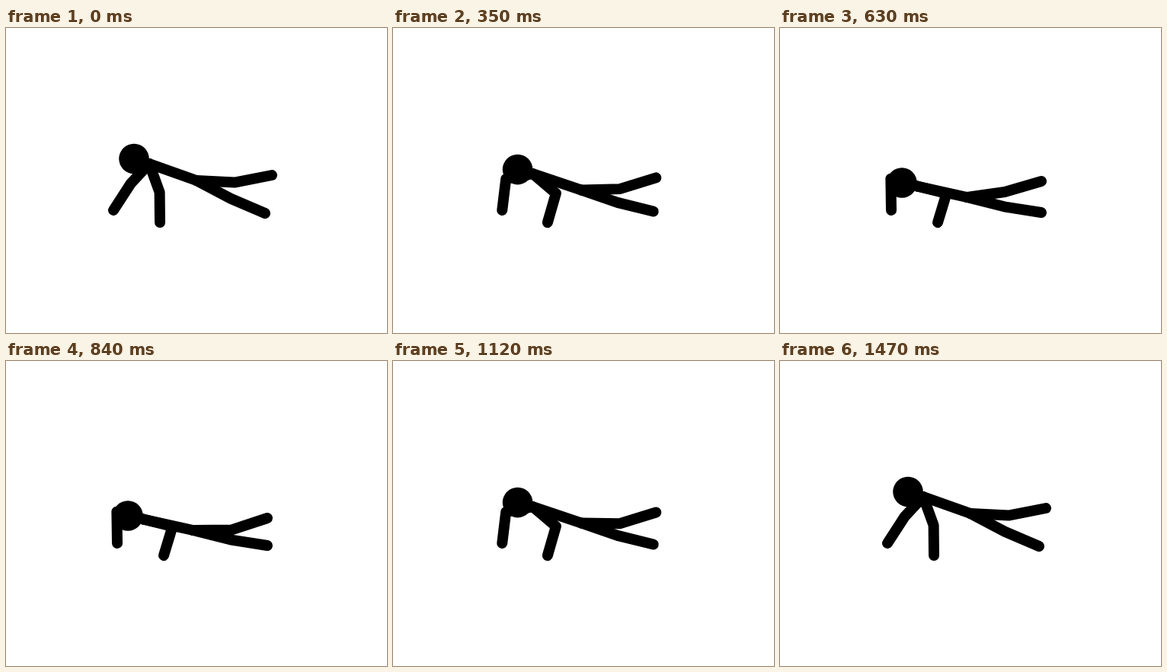
An HTML page with a canvas for the animation above (1540 ms loop, 500 by 400 pixels).

```html
<!DOCTYPE html>
<html lang="en">
<head>
<meta charset="utf-8">
<title>Push-ups</title>
<style>
  html, body { margin: 0; width: 100%; height: 100%; overflow: hidden; background: #fff; }
  canvas { display: block; }
</style>
</head>
<body>
<canvas id="stage" width="500" height="400"></canvas>
<script>
const ctx = document.getElementById('stage').getContext('2d');
const STEP = 70, COUNT = 22;
const DOWN = 9, UP = 12;   // the body rests low between these steps

const clamp = (v, lo, hi) => Math.max(lo, Math.min(hi, v));

// Middle joint of a two-part limb from a to b; side picks the way it bends.
function joint(a, b, la, lb, side) {
  const dx = b[0] - a[0], dy = b[1] - a[1];
  const d = Math.hypot(dx, dy);
  const along = (d * d + la * la - lb * lb) / (2 * d);
  const out = side * Math.sqrt(Math.max(0, la * la - along * along));
  return [a[0] + (dx * along - dy * out) / d, a[1] + (dy * along + dx * out) / d];
}

function limb(...points) {
  ctx.beginPath();
  points.forEach(p => ctx.lineTo(...p));
  ctx.stroke();
}

function draw(step) {
  const t = Math.min(step, COUNT - 1 - step, DOWN) / DOWN;
  const drop = t ** 1.37;
  const smooth = drop * drop * (3 - 2 * drop);
  const sink = 8 + 5 * clamp((step - DOWN) / (UP - DOWN), 0, 1);

  const head = [168 - 8 * t, 171.5 + 31.5 * drop];
  const neck = [188 - 8 * t, 178 + 29.5 * drop];
  const hip = [250 - 4.5 * t, 200 + 22 * t ** 0.95];
  const handL = [141 + 5 * drop, 239];
  const handR = [202 + 5 * t ** 3, 255];
  const lowFoot = [340 + 3 * t, 243 - t - 2 * Math.sin(Math.PI * t)];
  const lowKnee = [(hip[0] + lowFoot[0]) / 2, (hip[1] + lowFoot[1]) / 2 + 2.3];
  const foot = [349 - 6 * t ** 0.8, 193 + sink * smooth];

  ctx.fillStyle = '#fff';
  ctx.fillRect(0, 0, 500, 400);
  ctx.fillStyle = ctx.strokeStyle = '#000';
  ctx.lineWidth = 14;
  ctx.lineCap = ctx.lineJoin = 'round';

  limb(neck, hip);
  limb(neck, joint(neck, handL, 36, 41.3, 1), handL);
  limb(neck, joint(neck, handR, 39.7, 39.7, -1), handR);
  limb(hip, lowKnee, lowFoot);
  limb(hip, joint(hip, foot, 50, 50, 1), foot);
  ctx.beginPath();
  ctx.arc(...head, 19.8, 0, Math.PI * 2);
  ctx.fill();
}

const start = performance.now();
function tick() {
  draw(Math.floor((performance.now() - start) / STEP) % COUNT);
  requestAnimationFrame(tick);
}
tick();
</script>
</body>
</html>
```
